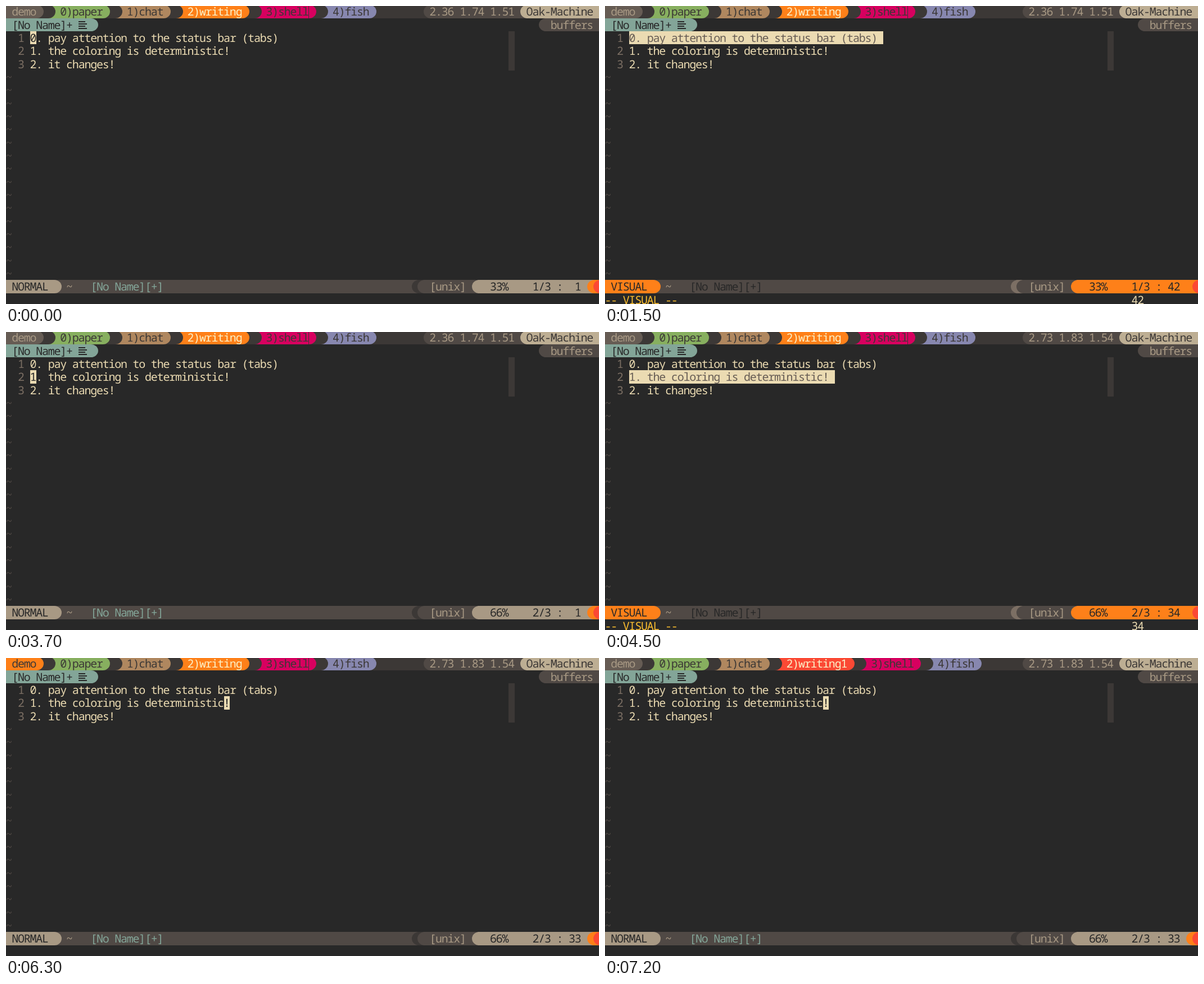
Animation of 1055 by 531 pixels, one loop 8 s. Source, as an HTML page:

```html
<!DOCTYPE html>
<html lang="en">
<head>
<meta charset="utf-8">
<title>Terminal tabs</title>
<style>
  html, body { margin: 0; width: 100%; height: 100%; overflow: hidden; background: #282828; }
  #screen {
    --cell: 10.77px;
    position: absolute; left: 0; top: 0; width: 1055px; height: 531px; overflow: hidden;
    font: 20px "Noto Sans Mono", "DejaVu Sans Mono", monospace;
    letter-spacing: calc(var(--cell) - .6em);
    text-indent: calc((var(--cell) - .6em) / 2);
    font-variant-ligatures: none; text-rendering: geometricPrecision;
  }
  #screen div { position: absolute; white-space: pre; }
</style>
</head>
<body>
<div id="screen"></div>
<script>
const CELL = 10.77, ROW = 23.33, COLS = 98, CAP = 13, LOOP = 8000;
const C = {
  bg: '#282828', bg1: '#3c3836', bg2: '#504945', bg3: '#665c54', bg4: '#7c6f64',
  grey: '#a89984', tan: '#bdae93', cream: '#ebdbb2', white: '#fbf1c7',
  orange: '#fe8019', red: '#fb4934', yellow: '#fabd2f', blue: '#83a598'
};
const LINES = [
  '0. pay attention to the status bar (tabs)',
  '1. the coloring is deterministic!',
  '2. it changes!'
];
const TEXT_COL = 4;

// Each step overrides the state left by the one before it.
const STEPS = [
  [0,    { line: 0, col: 1, visual: false, cursor: true, load: '2.36 1.74 1.51', prompt: null, prefix: false, name: 'writing' }],
  [1100, { visual: true }],
  [1500, { col: 42 }],
  [2900, { visual: false, col: 41 }],
  [3500, { line: 1, col: 33 }],
  [3700, { col: 1 }],
  [4100, { visual: true }],
  [4400, { load: '2.73 1.83 1.54' }],
  [4500, { col: 34 }],
  [5100, { visual: false, col: 33 }],
  [6300, { prefix: true }],
  [6500, { prefix: false, prompt: 'writing', cursor: false }],
  [7100, { prompt: 'writing1' }],
  [7200, { prompt: null, cursor: true, name: 'writing1' }]
];

const screen = document.getElementById('screen');
const rowTop = row => Math.round(row * ROW - 1.6);

function box(x, y, width, height, color, radius = '0') {
  const el = document.createElement('div');
  el.style.cssText = `left:${x}px;top:${y}px;width:${width}px;height:${height}px;` +
    `background:${color};border-radius:${radius};line-height:${height}px`;
  screen.append(el);
  return el;
}

function fill(col, row, cells, color, rows = 1) {
  const top = rowTop(row);
  return box(col * CELL, top, cells * CELL, rowTop(row + rows) - top, color);
}

function put(col, row, text, color, back = 'transparent') {
  const el = fill(col, row, text.length, back);
  el.style.color = color;
  el.textContent = text;
}

function cap(col, row, color, side) {
  const top = rowTop(row);
  const radius = side === 'right' ? '0 100% 100% 0 / 0 50% 50% 0' : '100% 0 0 100% / 50% 0 0 50%';
  box(col * CELL, top, CAP, rowTop(row + 1) - top, color, radius);
}

// A bar section open to the right, with a round left end.
function rightSection(col, row, color, end = COLS) {
  cap(col, row, color, 'left');
  fill(col + 1, row, end - col - 1, color);
}

function leftSection(cells, row, color) {
  fill(0, row, cells, color);
  cap(cells, row, color, 'right');
}

function drawTabs(s) {
  fill(0, 0, COLS, C.bg1);
  leftSection(5, 0, s.prefix ? C.orange : C.bg3);
  put(1, 0, 'demo', s.prefix ? C.bg1 : C.grey);

  const tabs = [
    ['paper', '#87af5f'],
    ['chat', '#af875f'],
    [s.name, s.name === 'writing' ? C.orange : C.red],
    ['shell', '#d7005f'],
    ['fish', '#8787af']
  ];
  let col = 7;
  tabs.forEach(([name, color], i) => {
    const label = `${i})${name}`, end = col + 2 + label.length;
    fill(col, 0, end - col, color);
    cap(col, 0, C.bg1, 'right');
    put(col + 2, 0, label, i === 2 ? C.white : C.bg1);
    cap(end, 0, color, 'right');
    col = end + 2;
  });

  rightSection(69, 0, C.bg2, 86);
  put(70, 0, s.load, C.grey);
  rightSection(85, 0, C.tan);
  put(86, 0, 'Oak-Machine', C.bg1);
}

function drawPrompt(text) {
  const line = `(rename-window) ${text}`;
  fill(0, 0, COLS, C.tan);
  put(0, 0, line, C.bg1);
  fill(line.length, 0, 1, C.bg1);
}

function drawBuffers() {
  leftSection(14, 1, C.blue);
  put(1, 1, '[No Name]+', C.bg);
  [12, 15, 12, 15].forEach((width, i) => box(129, 27 + i * 4, width, 2, C.bg));
  rightSection(88, 1, C.bg2);
  put(90, 1, 'buffers', C.grey);
}

function drawEditor(s) {
  LINES.forEach((text, i) => {
    put(2, i + 2, String(i + 1), C.bg4);
    put(TEXT_COL, i + 2, text, C.cream);
  });
  for (let row = 5; row <= 20; row++) put(0, row, '~', C.bg2);
  fill(83, 2, 1, C.bg1, 3);

  const row = s.line + 2, text = LINES[s.line];
  if (s.visual && s.col > 1) {
    put(TEXT_COL, row, text + ' ', C.bg3, C.cream);
  } else if (s.cursor) {
    const char = text[s.col - 1];
    if (char === ')') {
      const open = text.indexOf('(');
      put(TEXT_COL + open, row, '(', C.cream, C.bg3);
    }
    put(TEXT_COL + s.col - 1, row, char, C.bg, C.cream);
  }
}

function drawStatus(s) {
  const row = 21, mode = s.visual ? C.orange : C.grey;
  fill(0, row, COLS, C.bg2);
  leftSection(8, row, mode);
  put(1, row, s.visual ? 'VISUAL' : 'NORMAL', C.bg);
  put(10, row, '~', C.grey);
  put(14, row, '[No Name][+]', s.visual ? C.bg : C.blue);

  rightSection(67, row, s.visual ? C.bg4 : C.bg1, 69);
  rightSection(68, row, C.bg2, 77);
  put(70, row, '[unix]', C.grey);
  rightSection(77, row, mode);
  put(80, row, s.line ? '66%' : '33%', C.bg);
  put(87, row, `${s.line + 1}/3 : ${String(s.col).padStart(2)}`, C.bg);
  rightSection(96, row, C.orange);
  rightSection(97, row, C.red);

  if (s.visual) {
    put(0, 22, '-- VISUAL --', C.yellow);
    put(87, 22, String(s.col), C.cream);
  }
}

function draw(s) {
  screen.replaceChildren();
  if (s.prompt === null) drawTabs(s);
  else drawPrompt(s.prompt);
  drawBuffers();
  drawEditor(s);
  drawStatus(s);
}

const start = performance.now();
let shown = -1;

function tick() {
  const time = (performance.now() - start) % LOOP;
  const count = STEPS.filter(([at]) => at <= time).length;
  if (count !== shown) {
    shown = count;
    draw(Object.assign({}, ...STEPS.slice(0, count).map(([, change]) => change)));
  }
  requestAnimationFrame(tick);
}
tick();
</script>
</body>
</html>
```
